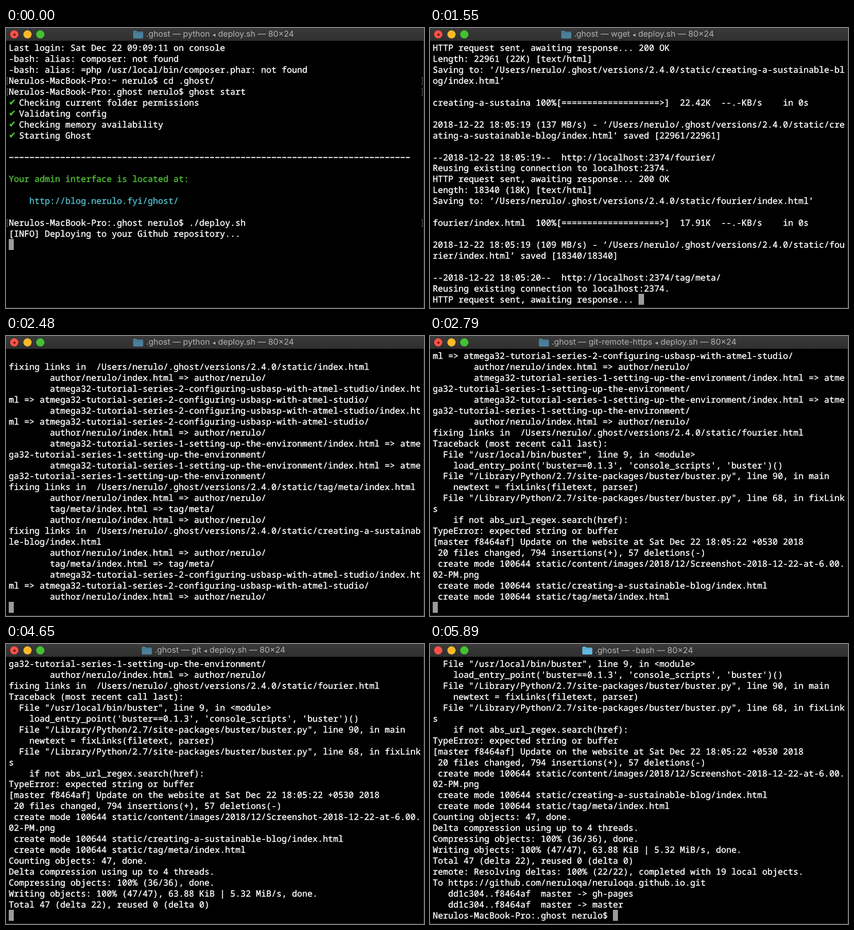
An HTML page that plays this animation: 914x613 px, repeating every 6200 ms.

```html
<!DOCTYPE html>
<html lang="en">
<head>
<meta charset="utf-8">
<title>Terminal</title>
<style>
  html, body { margin: 0; width: 100%; height: 100%; overflow: hidden; background: #000; }
  #window {
    position: relative; width: 914px; height: 613px; overflow: hidden;
    background: #000; text-rendering: geometricPrecision;
  }
  #window::after { content: ""; position: absolute; inset: 0; box-shadow: inset -1px -1px #383838; }
  #bar { position: absolute; inset: 0 0 auto; height: 28px; background: linear-gradient(#3a3a3a, #2f2f2f); }
  .light { position: absolute; top: 5px; width: 18px; height: 18px; border-radius: 50%; }
  #close { left: 9px; background: #ff5147; }
  #minimize { left: 37.5px; background: #fdb927; }
  #zoom { left: 65.5px; background: #43c332; }
  .busy #close::after {
    content: ""; position: absolute; left: 6.5px; top: 6.5px;
    width: 5px; height: 5px; border-radius: 50%; background: #7c0d08;
  }
  #heading {
    position: absolute; left: 0; top: 0; width: 908px; height: 29px;
    display: flex; justify-content: center; align-items: center; gap: 6px;
    font: 17.9px/29px Inter, sans-serif; color: #b2b2b2; white-space: pre;
  }
  #arrow { display: inline-block; width: 8px; font-size: 13px; text-align: center; }
  #folder { width: 22px; height: 17px; color: #62b8e2; }
  .busy #folder { color: #4c7f9a; }
  #screen {
    position: absolute; left: 6px; top: 32px; color: #fcfcfc;
    font: 500 18.77px/23.96px "Noto Sans Mono", "DejaVu Sans Mono", monospace;
    font-variant-ligatures: none; -webkit-text-stroke: .45px;
  }
  .row { position: relative; height: 23.96px; white-space: pre; }
  .row:last-child::after {
    content: ""; display: inline-block; vertical-align: top;
    width: 11.5px; height: 24px; margin: -1px 0 0 -.4px; background: #9b9b9b;
  }
  .green { color: #4fc434; }
  .cyan { color: #55bfcd; }
  .done { padding-left: 2ch; }
  .done::before {
    content: "\2714"; position: absolute; left: 0; color: #4fc92f;
    font-family: "DejaVu Sans", sans-serif;
  }
  .prompt::before, .prompt::after {
    content: ""; position: absolute; top: 4px; width: 3px; height: 16px;
    box-sizing: border-box; border: 1px solid #777;
  }
  .prompt::before { left: -4px; border-right: 0; }
  .prompt::after { left: 902px; border-left: 0; }
</style>
</head>
<body>
<div id="window" class="busy">
  <div id="bar">
    <div class="light" id="close"></div>
    <div class="light" id="minimize"></div>
    <div class="light" id="zoom"></div>
    <div id="heading">
      <svg id="folder" viewBox="0 0 22 17">
        <path d="M0 2Q0 0 2 0H7L9 2H20Q22 2 22 4V15Q22 17 20 17H2Q0 17 0 15Z" fill="currentColor"/>
        <path d="M0 4.5H22" stroke="#000" stroke-opacity=".2"/>
      </svg>
      <span id="title"></span>
    </div>
  </div>
  <div id="screen"></div>
</div>
<script>
const LOOP = 6200, COLS = 80, ROWS = 24;
const USER = "nerulo", ACCOUNT = "neruloqa", HOST = "Nerulos-MacBook-Pro";
const STATIC = `/Users/${USER}/.ghost/versions/2.4.0/static/`;
const SERIES_1 = "atmega32-tutorial-series-1-setting-up-the-environment/";
const SERIES_2 = "atmega32-tutorial-series-2-configuring-usbasp-with-atmel-studio/";
const AUTHOR = `author/${USER}/`;
const REUSE = "Reusing existing connection to localhost:2374.";

const scenes = [];
let log = "";

const print = (...lines) => { log += lines.join("\n") + "\n"; };
const wrap = line => line.match(new RegExp(`.{1,${COLS}}`, "g")) || [""];

// Record the visible tail of the log, shown from the given time on.
function snap(at, process) {
  const busy = process !== "-bash";
  const job = busy ? `${process} <span id="arrow">◂</span> deploy.sh` : process;
  scenes.push({
    at,
    busy,
    title: `.ghost — ${job} — 80×24`,
    rows: log.split("\n").flatMap(wrap).slice(-ROWS)
  });
}

function download(path, second, size, speed, { at, took = "0s", link = REUSE } = {}) {
  const stamp = `2018-12-22 18:05:${second}`;
  const page = path === "" || path.endsWith("/");
  const file = page ? path + "index.html" : path;
  const type = page ? "text/html" : "image/" + path.split(".").pop().replace("jpg", "jpeg");
  const mega = size > 1e6;
  const unit = mega ? "M" : "K";
  const amount = size / (mega ? 1048576 : 1024);
  const brief = amount.toFixed(amount < 10 ? 1 : 0) + unit;
  const exact = (amount.toFixed(2) + unit).padStart(8);

  print(`--${stamp}--  http://localhost:2374/${path}`, link);
  log += "HTTP request sent, awaiting response... ";
  if (at) snap(at, "wget");
  print(
    "200 OK",
    `Length: ${size} (${brief}) [${type}]`,
    `Saving to: ‘${STATIC}${file}’`,
    "",
    `${file.slice(0, 19).padEnd(19)} 100%[${"=".repeat(19)}>]${exact}  --.-KB/s    in ${took}`,
    "",
    `${stamp} (${speed} MB/s) - ‘${STATIC}${file}’ saved [${size}/${size}]`,
    ""
  );
}

function fixLinks(file, ...targets) {
  print(`fixing links in  ${STATIC}${file}`);
  for (const t of targets) print(`        ${t}index.html => ${t}`);
}

print(
  "Last login: Sat Dec 22 09:09:11 on console",
  "-bash: alias: composer: not found",
  "-bash: alias: =php /usr/local/bin/composer.phar: not found",
  `${HOST}:~ ${USER}$ cd .ghost/`,
  `${HOST}:.ghost ${USER}$ ghost start`,
  "✔ Checking current folder permissions",
  "✔ Validating config",
  "✔ Checking memory availability",
  "✔ Starting Ghost",
  "",
  "−".repeat(78),
  "",
  "Your admin interface is located at:",
  "",
  `    http://blog.${USER}.fyi/ghost/`,
  "",
  `${HOST}:.ghost ${USER}$ ./deploy.sh`,
  "[INFO] Deploying to your Github repository..."
);
snap(0, "python");

const image = name => "content/images/2018/" + name;
download("", 17, 25410, "121", {
  at: 620,
  link: "Resolving localhost... ::1, 127.0.0.1\nConnecting to localhost|::1|:2374... connected."
});
download(AUTHOR, 18, 27872, "144");
download(image("12/3XPPLbiL_400x400-1.jpg"), 18, 14680, "75.3");
download("analysing-second-order-system/", 18, 31206, "149", { at: 930 });
download(image("12/Screenshot-2018-12-22-at-6.00.02-PM.png"), 19, 88214, "168");
download("creating-a-sustainable-blog/", 19, 22961, "137", { at: 1240 });
download("fourier/", 19, 18340, "109");
download("tag/meta/", 20, 12418, "98.7", { at: 1550 });
download(SERIES_2, 20, 26733, "142");
download(SERIES_1, 20, 24190, "131", { at: 1860 });
download(image("11/image.png"), 21, 29104, "127");
download(image("11/ezgif-2-461da576d573.gif"), 21, 4537222, "264", { took: "0.02s" });
download(image("11/Screenshot-2018-11-08-at-10.09.16-PM-1.png"), 21, 64512, "155", { at: 2170 });

fixLinks("index.html", AUTHOR, SERIES_2, SERIES_2, AUTHOR, SERIES_1, SERIES_1);
fixLinks("tag/meta/index.html", AUTHOR, "tag/meta/", AUTHOR);
fixLinks("creating-a-sustainable-blog/index.html", AUTHOR, "tag/meta/", SERIES_2, AUTHOR);
snap(2480, "python");

fixLinks("author.html", SERIES_2, AUTHOR, SERIES_1, SERIES_1, AUTHOR);
fixLinks("fourier.html");
print(
  "Traceback (most recent call last):",
  '  File "/usr/local/bin/buster", line 9, in <module>',
  "    load_entry_point('buster==0.1.3', 'console_scripts', 'buster')()",
  '  File "/Library/Python/2.7/site-packages/buster/buster.py", line 90, in main',
  "    newtext = fixLinks(filetext, parser)",
  '  File "/Library/Python/2.7/site-packages/buster/buster.py", line 68, in fixLinks',
  "    if not abs_url_regex.search(href):",
  "TypeError: expected string or buffer",
  "[master f8464af] Update on the website at Sat Dec 22 18:05:22 +0530 2018",
  " 20 files changed, 794 insertions(+), 57 deletions(-)",
  " create mode 100644 static/content/images/2018/12/Screenshot-2018-12-22-at-6.00.02-PM.png",
  " create mode 100644 static/creating-a-sustainable-blog/index.html",
  " create mode 100644 static/tag/meta/index.html"
);
snap(2790, "git-remote-https");
snap(3720, "git");

print(
  "Counting objects: 47, done.",
  "Delta compression using up to 4 threads.",
  "Compressing objects: 100% (36/36), done.",
  "Writing objects: 100% (47/47), 63.88 KiB | 5.32 MiB/s, done.",
  "Total 47 (delta 22), reused 0 (delta 0)"
);
snap(4340, "git");
print("remote: Resolving deltas: 100% (22/22), completed with 19 local objects.");
snap(4960, "git");
print(
  `To https://github.com/${ACCOUNT}/${ACCOUNT}.github.io.git`,
  "   dd1c304..f8464af  master -> gh-pages",
  "   dd1c304..f8464af  master -> master"
);
log += `${HOST}:.ghost ${USER}$ `;
snap(5580, "-bash");

function styleOf(text) {
  if (text.startsWith("✔")) return "done";
  if (text.startsWith("Your admin")) return "green";
  if (text.startsWith("    http")) return "cyan";
  if (text.startsWith(HOST) && !text.endsWith(" ")) return "prompt";
  return "";
}

const byId = id => document.getElementById(id);
let current;

function show(scene) {
  byId("window").className = scene.busy ? "busy" : "";
  byId("title").innerHTML = scene.title;
  byId("screen").replaceChildren(...scene.rows.map(text => {
    const row = document.createElement("div");
    row.className = `row ${styleOf(text)}`;
    row.textContent = text.replace("✔ ", "");
    return row;
  }));
}

function tick() {
  const time = performance.now() % LOOP;
  const scene = scenes.findLast(s => s.at <= time);
  if (scene !== current) show(current = scene);
  requestAnimationFrame(tick);
}
tick();
</script>
</body>
</html>
```
